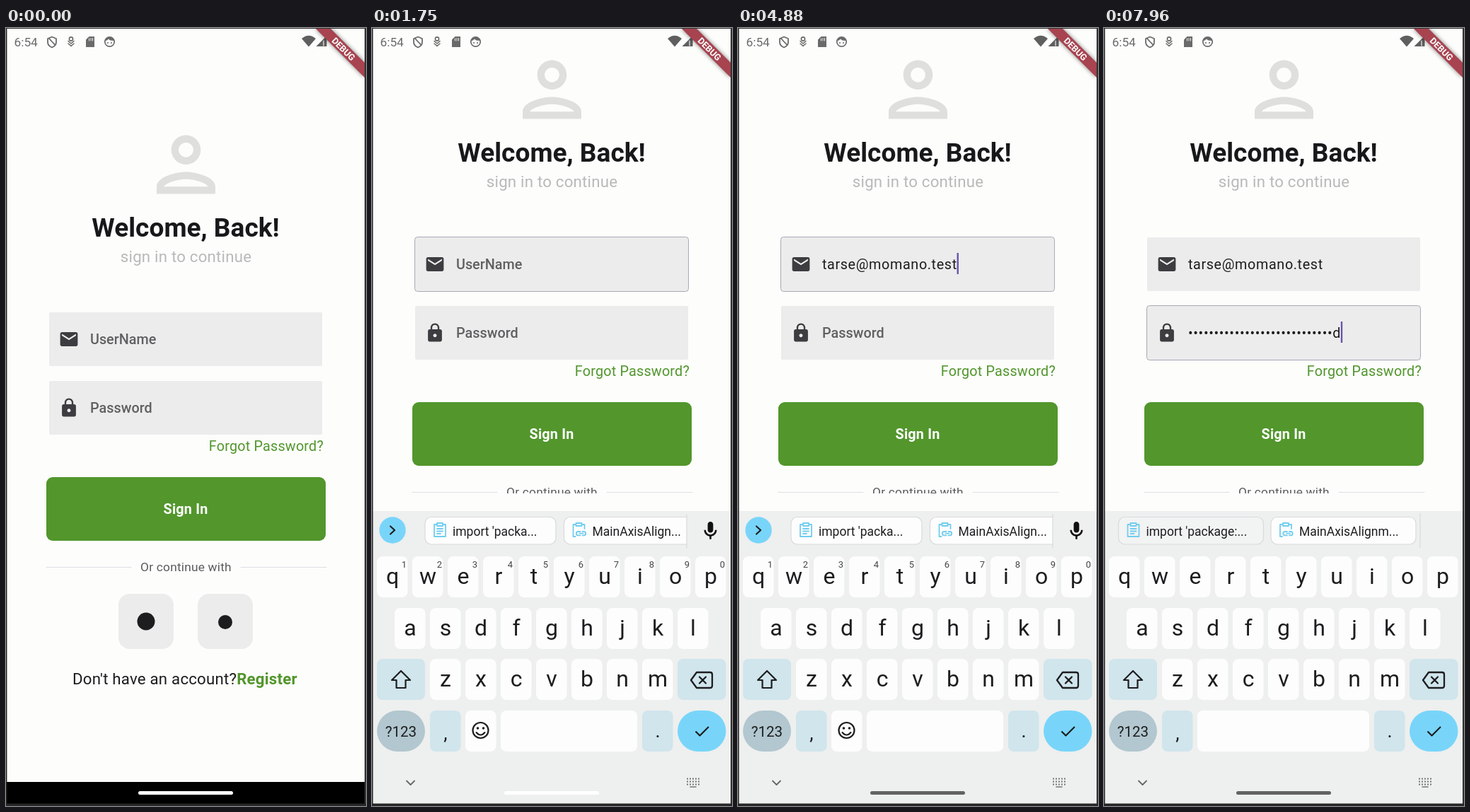
These frames come from a looping animation (509x1100 px, 8000 ms). An HTML page:

```html
<!DOCTYPE html>
<html lang="en">
<head>
<meta charset="utf-8">
<title>Sign in</title>
<style>
  html, body { margin: 0; width: 100%; height: 100%; overflow: hidden; background: #fdfdfc; }
  svg { display: block; width: 509px; height: 1100px; font-family: Roboto, sans-serif; }
  text { white-space: pre; }
  .mid { text-anchor: middle; }
  .end { text-anchor: end; }
  .bold { font-weight: 700; }
  .medium { font-weight: 500; }
  .spaced { letter-spacing: .2px; }
  .input { letter-spacing: .62px; }
  .line { fill: none; stroke-linecap: round; stroke-linejoin: round; }
</style>
</head>
<body>
<svg id="stage" viewBox="0 0 509 1100"></svg>
<script>
const LOOP = 8000;
const PAGE = '#fdfdfc', FIELD = '#ececec', INK = '#1d1d1f', GREEN = '#52962c';
const BOARD = '#eeefef', KEY = '#fdfdfd', SOFT_KEY = '#d0e5ec', BLUE = '#78d5f9';

const rect = (x, y, w, h, r, fill, extra = '') =>
  `<rect x="${x}" y="${y}" width="${w}" height="${h}" rx="${r}" fill="${fill}" ${extra}/>`;
const circle = (x, y, r, fill, extra = '') =>
  `<circle cx="${x}" cy="${y}" r="${r}" fill="${fill}" ${extra}/>`;
const text = (x, y, size, str, fill, cls = '', id = '') =>
  `<text x="${x}" y="${y}" font-size="${size}" fill="${fill}" class="${cls}" id="${id}">${str}</text>`;
const line = (d, color, width = 2, extra = '') =>
  `<path class="line" d="${d}" stroke="${color}" stroke-width="${width}" ${extra}/>`;
// Places a 24-unit glyph centred on (cx, cy).
const at = (cx, cy, size, body) =>
  `<g transform="translate(${cx - size / 2} ${cy - size / 2}) scale(${size / 24})">${body}</g>`;
const icon = (cx, cy, size, d, fill) => at(cx, cy, size, `<path d="${d}" fill="${fill}"/>`);
const group = (id, body) => `<g id="${id}">${body}</g>`;

const PERSON = 'M12 6c1.1 0 2 .9 2 2s-.9 2-2 2-2-.9-2-2 .9-2 2-2m0 10c2.7 0 5.8 1.29 6 2H6c.23-.72 3.31-2 6-2m0-12C9.79 4 8 5.79 8 8s1.79 4 4 4 4-1.79 4-4-1.79-4-4-4zm0 10c-2.67 0-8 1.34-8 4v2h16v-2c0-2.66-5.33-4-8-4z';
const MAIL = 'M20 4H4c-1.1 0-2 .9-2 2v12c0 1.1.9 2 2 2h16c1.1 0 2-.9 2-2V6c0-1.1-.9-2-2-2zm0 4-8 5-8-5V6l8 5 8-5z';
const LOCK = 'M18 8h-1V6c0-2.76-2.24-5-5-5S7 3.24 7 6v2H6c-1.1 0-2 .9-2 2v10c0 1.1.9 2 2 2h12c1.1 0 2-.9 2-2V10c0-1.1-.9-2-2-2zm-6 9c-1.1 0-2-.9-2-2s.9-2 2-2 2 .9 2 2-.9 2-2 2zm3.1-9H8.9V6c0-1.71 1.39-3.1 3.1-3.1s3.1 1.39 3.1 3.1z';
const MIC = 'M12 14c1.66 0 3-1.34 3-3V5c0-1.66-1.34-3-3-3S9 3.34 9 5v6c0 1.66 1.34 3 3 3zm5-3c0 2.76-2.24 5-5 5s-5-2.24-5-5H5c0 3.53 2.61 6.43 6 6.92V21h2v-3.08c3.39-.49 6-3.39 6-6.92z';

function field(name, top, glyph, label) {
  return rect(61, top, 386, 76, 2, FIELD) +
    rect(60.5, top - .5, 387, 77, 4, FIELD, `stroke="#aaa8b6" id="${name}Border"`) +
    icon(89, top + 38, 29.7, glyph, '#3d3c40') +
    text(119, top + 45, 19.8, label, '#606062', 'medium', name + 'Label') +
    text(119, top + 45, 19.8, '', INK, 'input', name + 'Text') +
    rect(119, top + 22, 2.4, 30, 0, '#6a55ad', `id="${name}Cursor"`);
}

function form() {
  const social = x => rect(x, 800, 78, 78, 16, FIELD);
  return icon(254.5, 193, 124.5, PERSON, '#dfdfdd') +
    text(254, 294.5, 37.1, 'Welcome, Back!', '#17181a', 'mid bold') +
    text(254.5, 331, 22.28, 'sign in to continue', '#b9b9b9', 'mid spaced') +
    field('user', 402, MAIL, 'UserName') +
    field('pass', 499, LOCK, 'Password') +
    text(449, 598, 19.8, 'Forgot Password?', GREEN, 'end spaced') +
    rect(57, 635, 395, 90, 9, GREEN) +
    text(254, 687, 19.8, 'Sign In', '#fff', 'mid bold spaced') +
    line('M57 762.5H177M332 762.5H453', '#dfdfe5', 1.2) +
    text(254.5, 768, 17.33, 'Or continue with', '#5c5c5e', 'mid spaced') +
    social(159) + circle(198, 839, 12.5, INK) +
    social(271) + circle(310, 840, 10, INK) +
    text(94, 928, 22.28, `Don't have an account?<tspan class="bold" fill="${GREEN}">Register</tspan>`, INK, 'spaced');
}

const keyBox = (x, y, w, fill = KEY, r = 8, extra = '') => rect(x, y, w, 58, r, fill, extra);

function keys() {
  const rows = [['qwertyuiop', 29, 747, 787], ['asdfghjkl', 54, 820, 860], ['zxcvbnm', 104, 892, 932]];
  let boxes = '', lower = '', upper = '', hints = '';
  for (const [letters, x0, top, base] of rows) {
    [...letters].forEach((ch, i) => {
      const x = x0 + i * 50;
      boxes += keyBox(x - 22, top, 43.5);
      lower += text(x, base - 1, 32, ch, INK, 'mid');
      upper += text(x, base + 1, 30.5, ch.toUpperCase(), INK, 'mid');
      if (top === 747) hints += text(x + 16.5, 762.5, 13, (i + 1) % 10, '#444', 'mid');
    });
  }
  const shift = 'M41 909L54 922H47.5V933H34.5V922H28Z';
  return boxes + group('hints', hints) +
    keyBox(7, 892, 68, SOFT_KEY) + keyBox(432, 892, 68.5, SOFT_KEY) +
    group('lower', lower + line(shift, INK, 2.2)) +
    group('upper', upper + `<path d="${shift}" fill="#111" stroke="#111" stroke-width="2" stroke-linejoin="round"/>`) +
    line('M459 911H478Q481 911 481 914V930Q481 933 478 933H459L451 922ZM463 917.5L472 926.5M472 917.5L463 926.5', INK, 2.3);
}

function bottomKeys() {
  return keyBox(7, 965, 68, '#b2c7cf', 29) + text(41, 1002, 20.5, '?123', INK, 'mid') +
    keyBox(82, 965, 43.5, SOFT_KEY) + text(104, 1006, 27, ',', INK, 'mid') +
    keyBox(382, 965, 43.5, SOFT_KEY) + text(404, 1003, 27, '.', INK, 'mid') +
    group('emojiRow', keyBox(132, 965, 43.5) + keyBox(182, 965, 193) +
      circle(153.5, 993, 11, 'none', `stroke="${INK}" stroke-width="2.2"`) +
      circle(149.5, 990, 1.8, INK) + circle(157.5, 990, 1.8, INK) +
      line('M147.5 996Q153.5 1003 159.5 996', INK, 2)) +
    group('plainRow', keyBox(132, 965, 243)) +
    keyBox(432, 965, 68.5, BLUE, 29) + line('M457.5 994.5L463.5 1000.5L476 988', INK, 2.2, 'style="stroke-linecap:butt"') +
    line('M49 1064.5L54.5 1070L60 1064.5', '#666', 1.8) +
    line('M445 1061.5H463M445 1065.5H463M445 1069.5H463', '#777', 2, 'style="stroke-dasharray:2 2;stroke-linecap:butt"') +
    line('M450 1073H458', '#777', 1.6);
}

function chip(x, w, label, linked, id = '') {
  const detail = linked ? 'M14 14H11a2.7 2.7 0 0 0 0 5.4H14M17 14h2a2.7 2.7 0 0 1 0 5.4H17M13 16.7h5' : 'M8 10h8M8 13.5h8M8 17h5';
  const frame = linked ? 'M7 4H4V21H7M17 4H20V10' : 'M7 4H4V21H20V4H17';
  return rect(x, 691.5, w, 38.5, 9, KEY, `stroke="#d9dadb" stroke-width="1.2" ${id && `id="${id}"`}`) +
    at(x + 21, 710, 24, line(frame + 'M8 2H16V6H8Z' + detail, '#72cdef', 1.8)) +
    text(x + (linked ? 40 : 39), 717.5, 17.5, label, INK);
}

function strips() {
  const open = chip(75, 185, "import 'packa...", false) + chip(271.5, 185, 'MainAxisAlign...', true) +
    rect(445, 686, 62, 50, 0, BOARD) + line('M445 688V735', '#d8d9da', 1.2) +
    circle(29, 710, 18.7, BLUE) + line('M26 704.5L32 710L26 715.5', INK, 2.2) +
    icon(478.5, 711, 31, MIC, '#111');
  const secure = chip(20.5, 205, "import 'package:...", false, 'firstChip') +
    chip(236, 205, 'MainAxisAlignm...', true) + line('M447 686V735', '#d8d9da', 1.2);
  return group('openStrip', open) + group('secureStrip', secure);
}

function statusBar() {
  const grey = '#6a6a6a';
  return text(11.5, 26, 17.3, '6:54', grey) +
    line('M65 12.5L71 15V20Q71 25 65 27.5Q59 25 59 20V15ZM61 15L69.5 24', grey, 1.8) +
    circle(92, 15.5, 2.6, 'none', `stroke="${grey}" stroke-width="1.6"`) +
    line('M88 18.5L92 22L96 18.5M88 22L92 25.5L96 22', grey, 1.6) +
    `<path d="M117.5 12H125V27H113V16.5Z" fill="${grey}"/>` +
    line('M117.5 15V18M120 14.5V18M122.5 14.5V18', '#eee', 1) +
    circle(146.5, 19.5, 6.7, 'none', `stroke="${grey}" stroke-width="1.7"`) +
    `<path d="M140 18Q141 12.5 146.5 12.5T153 18Q146 18 145 15.5Q143 18 140 18Z" fill="${grey}"/>` +
    circle(144, 21, 1, grey) + circle(149, 21, 1, grey) +
    `<path d="M418 15Q428 6.500 438 15L428 26.500Z" fill="#5f5f5f"/><path d="M453.500 11V26H438.500Z" fill="#5f5f5f"/>` +
    line('M449 18V25', '#eee', 1.2);
}

function banner() {
  const band = 'M437 0H458L507 49V70Z';
  return `<path d="${band}" fill="#000" opacity=".5" filter="url(#blur)"/><path d="${band}" fill="#a84350"/>` +
    `<g transform="translate(477.2 29.800) rotate(45)">${text(0, 4.5, 12.6, 'DEBUG', '#fff', 'mid bold')}</g>`;
}

const stage = document.getElementById('stage');
stage.innerHTML = '<defs><filter id="blur" x="-20%" y="-20%" width="140%" height="140%"><feGaussianBlur stdDeviation="3"/></filter></defs>' +
  rect(0, 0, 509, 1100, 0, PAGE) +
  group('form', form()) +
  group('keyboard', rect(0, 658, 509, 25, 0, PAGE) + rect(0, 683, 509, 417, 0, BOARD) + keys() + bottomKeys() + strips()) +
  rect(0, 1066, 509, 34, 0, '#000', 'id="navBar"') +
  rect(187, 1079, 134, 5, 2.5, '#fff', 'id="pill"') +
  statusBar() + banner() +
  rect(0, 0, 1.4, 1100, 0, '#222') + rect(0, 0, 509, 1, 0, '#333') +
  rect(507, 0, 2, 1100, 0, '#333') + rect(0, 1096.5, 509, 3.5, 0, '#262626');

const el = {};
stage.querySelectorAll('[id]').forEach(node => { if (node.id) el[node.id] = node; });

const ramp = (t, from, to) => Math.min(1, Math.max(0, (t - from) / (to - from)));
const show = (name, on) => { el[name].style.display = on ? '' : 'none'; };
const fade = (name, value) => el[name].setAttribute('opacity', value);

const ADDRESS = 'tarse@momano.test';
const typedAt = [3040, 3130, 3210, 3290, 3370, 3460, 3790, 3830, 3880, 3920, 3960, 4170, 4250, 4380, 4580, 4750, 4880];
const MASH = 'oadskjfhdlsakfjsd';

function password(t) {
  if (t < 6450) return '';
  const step = Math.max(0, Math.floor((t - 6580) / 86));
  return '•'.repeat(Math.floor(step * 1.78)) + MASH[step % MASH.length];
}

function setField(name, value, cursorOn) {
  const node = el[name + 'Text'];
  if (node.textContent !== value) node.textContent = value;
  el[name + 'Cursor'].setAttribute('x', 118.8 + (value ? node.getComputedTextLength() : 0));
  show(name + 'Cursor', cursorOn);
}

function draw(t) {
  const rise = 1 - (1 - ramp(t, 1540, 1740)) ** 2;
  el.form.setAttribute('transform', `translate(0 ${-106 * rise})`);
  el.keyboard.setAttribute('transform', `translate(0 ${442 * (1 - rise)})`);
  fade('navBar', 1 - rise);
  el.pill.setAttribute('fill', t < 2880 ? '#fff' : '#636363');

  const caps = t >= 3370 && t < 3630;
  show('upper', caps);
  show('lower', !caps);
  const secure = t >= 5380;
  for (const name of ['hints', 'emojiRow', 'openStrip']) show(name, !secure);
  for (const name of ['plainRow', 'secureStrip']) show(name, secure);
  el.firstChip.setAttribute('fill', t < 6700 ? KEY : '#f2f3f3');

  const moved = ramp(t, 5290, 5450);
  fade('userBorder', ramp(t, 1250, 1400) - moved);
  fade('passBorder', moved);
  fade('userLabel', 1 - ramp(t, 3040, 3190));
  fade('passLabel', 1 - ramp(t, 6440, 6590));

  const userCursor = (t >= 1250 && t < 1700) || (t >= 2200 && t < 2700) || (t >= 3040 && t < 5290);
  const passCursor = (t >= 5290 && t < 5700) || t >= 6330;
  setField('user', ADDRESS.slice(0, typedAt.filter(time => time <= t).length), userCursor);
  setField('pass', password(t), passCursor);
}

const start = performance.now();
function tick() {
  draw((performance.now() - start) % LOOP);
  requestAnimationFrame(tick);
}
tick();
</script>
</body>
</html>
```
